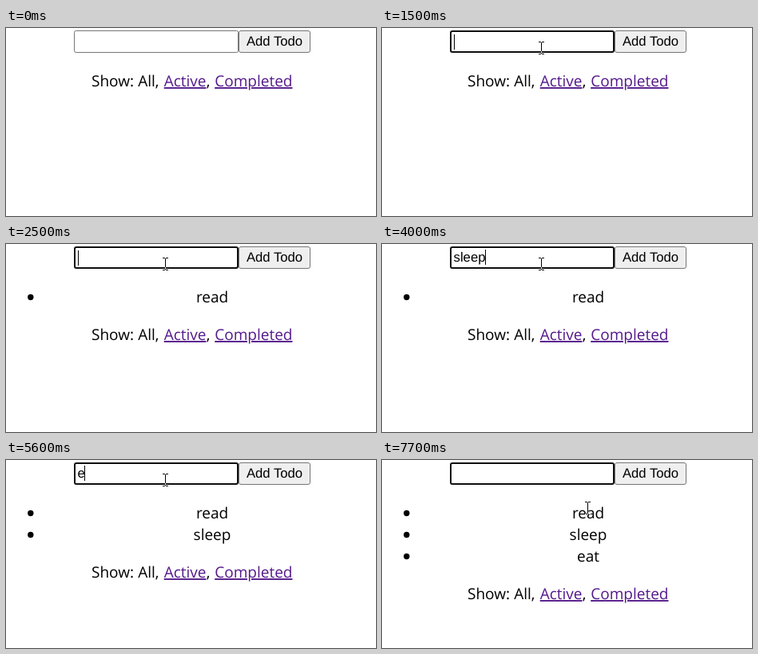
These frames come from a looping animation (463 by 235 pixels, 8 s). An HTML page:

```html
<!DOCTYPE html>
<html lang="en">
<head>
<meta charset="utf-8">
<title>Todo list</title>
<style>
  html, body { margin: 0; width: 100%; height: 100%; overflow: hidden; background: #fff; }
  svg { display: block; width: 463px; height: 235px; text-rendering: geometricPrecision; }
  text { font: 19px "Open Sans", "Noto Sans", sans-serif; white-space: pre; }
  .ui { font: 16.67px "Liberation Sans", Arial, sans-serif; }
  .mid { text-anchor: middle; }
  .link { fill: #551a8b; text-decoration: underline; text-decoration-thickness: 1px; text-underline-offset: 2px; }
  .box { fill: #fff; stroke: #767676; }
  .button { fill: #efefef; }
  .box.hover { stroke: #4f4f4f; }
  .button.hover { fill: #e5e5e5; }
  .box.focus { stroke: #101010; stroke-width: 2; }
  #beam { fill: none; stroke: #fff; mix-blend-mode: difference; }
  #arrow { fill: #fff; stroke: #000; }
</style>
</head>
<body>
<svg viewBox="0 0 463 235">
  <rect width="463" height="235" fill="#fff"/>
  <rect id="field" class="box" rx="2"/>
  <rect id="button" class="box button" x="291.5" y="3.5" width="89" height="27" rx="2.5"/>
  <text class="ui mid" x="336" y="22">Add Todo</text>
  <text id="typed" class="ui" x="89.6" y="22"></text>
  <rect id="caret" width="1" height="19"/>

  <g id="list"></g>
  <g id="filters">
    <text x="107" y="73">Show:</text>
    <text x="165.2" y="73">All,</text>
    <text class="link" x="197.7" y="73">Active</text>
    <text x="250.7" y="73">,</text>
    <text class="link" x="261.2" y="73">Completed</text>
  </g>

  <path id="beam" d="M-3-7.5h3m1 0h3M.5-7v14M-3 7.5h3m1 0h3"/>
  <path id="arrow" d="M.5.5v15.5l3.6-3.5 2.5 5.8 2.2-1-2.5-5.6h4.9z"/>
</svg>
<script>
  const LOOP = 8000;
  const $ = id => document.getElementById(id);
  const todos = ['read', 'sleep', 'eat'];
  const pitch = 27;

  // Each step changes part of the state from its time (ms) on.
  const steps = [
    [0, { text: '', caret: false, items: 0, over: '', focus: false, beam: null, arrow: null }],
    [100, { over: 'button', arrow: [322, 29] }],
    [200, { over: 'field', arrow: null, beam: [236, 24] }],
    [300, { beam: [199, 25] }],
    [500, { focus: true, caret: true }],
    [7400, { beam: [208, 26] }],
    [7500, { over: '', beam: null, arrow: [226, 38] }],
    [7600, { arrow: [246, 47] }],
    [7700, { caret: false, arrow: null, beam: [257, 60] }]
  ];

  const type = (word, times) => times.forEach(([t, n]) =>
    steps.push([t, { text: word.slice(0, n), caret: true }]));
  type('read', [[1700, 2], [1900, 3], [2300, 4]]);
  type('sleep', [[3300, 1], [3500, 2], [3700, 3], [3800, 4], [4000, 5]]);
  type('eat', [[5600, 1], [5800, 2], [6000, 3]]);
  [2500, 4300, 6300].forEach((t, i) => steps.push([t, { text: '', caret: true, items: i + 1 }]));
  [1000, 3000, 4800, 6800].forEach(t => steps.push([t, { caret: false }]));
  [1500, 5300, 7300].forEach(t => steps.push([t, { caret: true }]));
  steps.sort((a, b) => a[0] - b[0]);

  $('list').innerHTML = todos.map((word, i) =>
    `<g transform="translate(0 ${i * pitch})"><circle cx="30.8" cy="66.5" r="3.7"/>` +
    `<text class="mid" x="258" y="73">${word}</text></g>`).join('');
  const rows = [...$('list').children];

  const show = (el, on) => el.setAttribute('visibility', on ? 'visible' : 'hidden');
  const set = (el, attrs) => Object.entries(attrs).forEach(([k, v]) => el.setAttribute(k, v));

  function place(el, at) {
    show(el, at);
    if (at) set(el, { transform: `translate(${at})` });
  }

  function draw(t) {
    const s = Object.assign({}, ...steps.filter(p => p[0] <= t).map(p => p[1]));
    const inset = s.focus ? 1 : 0.5;
    set($('field'), { x: 85 + inset, y: 3 + inset, width: 206 - 2 * inset, height: 28 - 2 * inset });
    $('field').classList.toggle('focus', s.focus);
    ['field', 'button'].forEach(id => $(id).classList.toggle('hover', s.over === id));

    const typed = $('typed');
    typed.textContent = s.text;
    const width = s.text ? typed.getComputedTextLength() : 0;
    set($('caret'), { x: s.text ? Math.floor(89.5 + width) : 90, y: s.text ? 7 : 8 });
    show($('caret'), s.caret);

    rows.forEach((row, i) => show(row, i < s.items));
    const drop = s.items ? 20 + s.items * pitch : 0;
    set($('filters'), { transform: `translate(0 ${drop})` });
    place($('beam'), s.beam);
    place($('arrow'), s.arrow);
  }

  const start = performance.now();
  function tick() {
    draw((performance.now() - start) % LOOP);
    requestAnimationFrame(tick);
  }
  tick();
</script>
</body>
</html>
```
